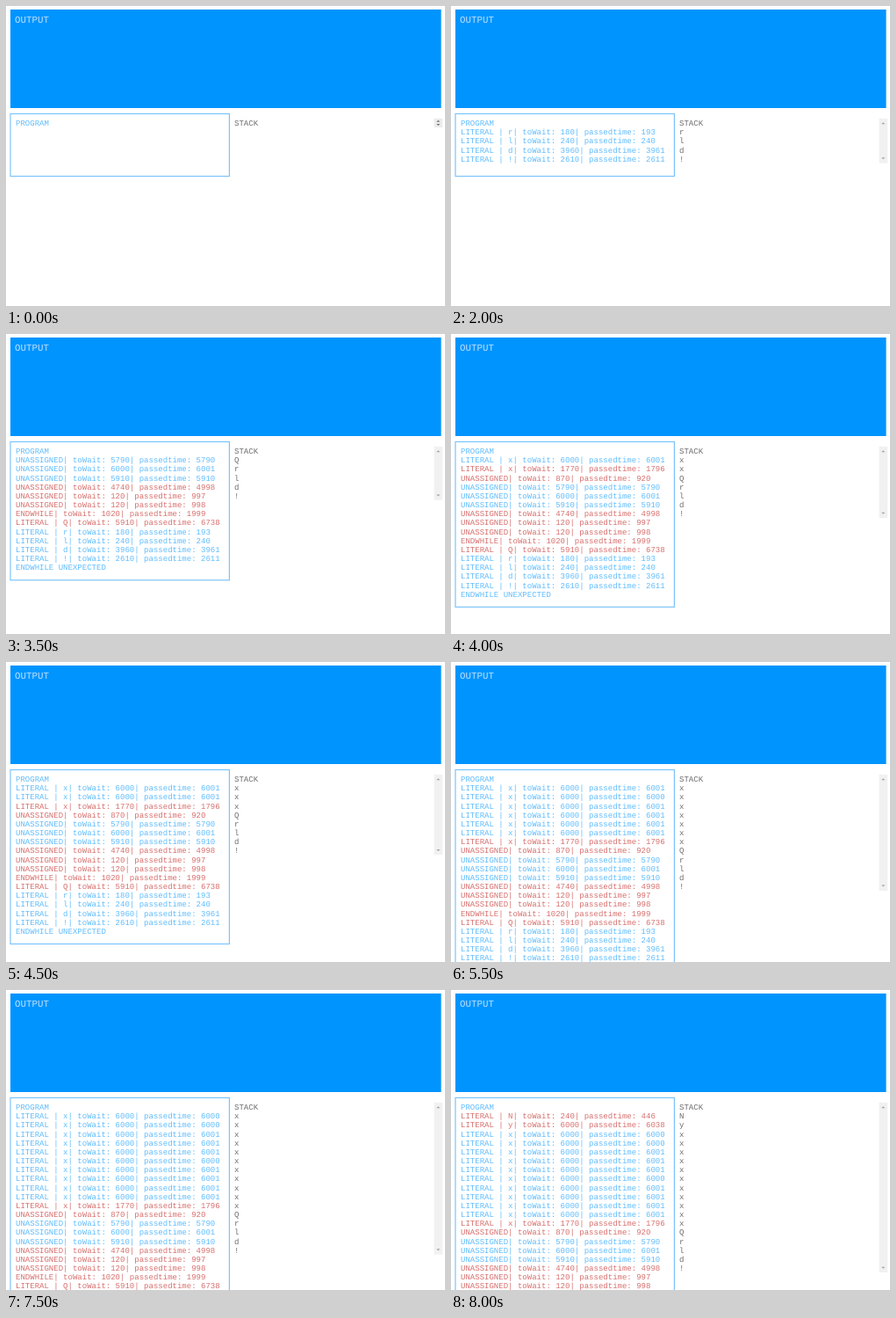
Write an HTML page that moves like this. It is 500x341 px and loops after 10 s.

```html
<!DOCTYPE html>
<html>
<head>
<meta charset="utf-8">
<style>
html, body { margin: 0; width: 100%; height: 100%; overflow: hidden; background: #fff; }
svg { display: block; width: 500px; height: 341px; }
text { font: 9.03px "Liberation Mono", "Courier New", monospace; text-rendering: geometricPrecision; }
.title { font-size: 10.8px; fill: #bfe2ff; }
.ok { fill: #5fbcfd; }
.late { fill: #d66f6d; }
.stack { fill: #6c6c6c; }
</style>
</head>
<body>
<svg viewBox="0 0 500 341">
  <rect x="5" y="4" width="490.6" height="112" fill="#0094ff"/>
  <text class="title" x="10" y="19">OUTPUT</text>
  <g id="live"></g>
</svg>
<script>
const LOOP = 10000, START = 2000, STEP = 500, PITCH = 10.17;
const live = document.getElementById('live');

const entry = (name, wait, passed) => ({
  text: `${name}| toWait: ${wait}| passedtime: ${passed}`,
  late: passed - wait > 20
});
const literal = (char, wait, passed) => ({ ...entry('LITERAL | ' + char, wait, passed), char });
const unassigned = (wait, passed) => entry('UNASSIGNED', wait, passed);

// newest entry first
const log = [
  literal('N', 240, 446),
  literal('y', 6000, 6038),
  ...[0, 0, 1, 1, 1, 0, 1, 1, 1, 1].map(extra => literal('x', 6000, 6000 + extra)),
  literal('x', 1770, 1796),
  unassigned(870, 920),
  unassigned(5790, 5790),
  unassigned(6000, 6001),
  unassigned(5910, 5910),
  unassigned(4740, 4998),
  unassigned(120, 997),
  unassigned(120, 998),
  entry('ENDWHILE', 1020, 1999),
  literal('Q', 5910, 6738),
  literal('r', 180, 193),
  literal('l', 240, 240),
  literal('d', 3960, 3961),
  literal('!', 2610, 2611),
  { text: 'ENDWHILE UNEXPECTED' }
];
// log length after each step
const sizes = [0, 4, 11, 12, 13, 16, 17, 20, 21, 22, 23, 24, 25, 27];

function linesAt(step) {
  if (step === 0) return [];
  if (step === 1) return log.slice(-5, -1);
  return log.slice(-sizes[step]);
}

const row = (x, i, text, cls) =>
  `<text class="${cls}" x="${x}" y="${136 + i * PITCH}">${text}</text>`;

const arrow = (y, dir, color) =>
  `<path d="M490.3 ${y + dir}h4l-2 ${-2 * dir}z" fill="${color}"/>`;

function scrollbar(rows) {
  const height = rows * PITCH, end = 127.8 + height, idle = rows > 1;
  const inset = idle ? 5.4 : 3;
  const color = idle ? '#a0a0a0' : '#707070';
  return `<rect x="487.6" y="127.8" width="9.6" height="${height}" fill="${idle ? '#f1f1f1' : '#ececec'}"/>` +
    arrow(127.8 + inset, 1, color) + arrow(end - inset, -1, color);
}

function draw(step) {
  const lines = linesAt(step);
  const stack = lines.filter(l => l.char).map(l => l.char);
  const bottom = Math.max(193.5, 147.6 + lines.length * PITCH);
  live.innerHTML =
    `<rect x="5" y="122.5" width="249.4" height="${bottom - 122.5}" fill="none" stroke="#7cc4fb" stroke-width="1.2"/>` +
    row(11, 0, 'PROGRAM', 'ok') +
    lines.map((l, i) => row(11, i + 1, l.text, l.late ? 'late' : 'ok')).join('') +
    row(260, 0, 'STACK', 'stack') +
    stack.map((c, i) => row(260, i + 1, c, 'stack')).join('') +
    scrollbar(stack.length + 1);
}

let shown = -1;
const begin = performance.now();
function tick() {
  const t = (performance.now() - begin) % LOOP;
  const step = t < START ? 0 : Math.min(sizes.length - 1, 1 + Math.floor((t - START) / STEP));
  if (step !== shown) draw(shown = step);
  requestAnimationFrame(tick);
}
tick();
</script>
</body>
</html>
```
